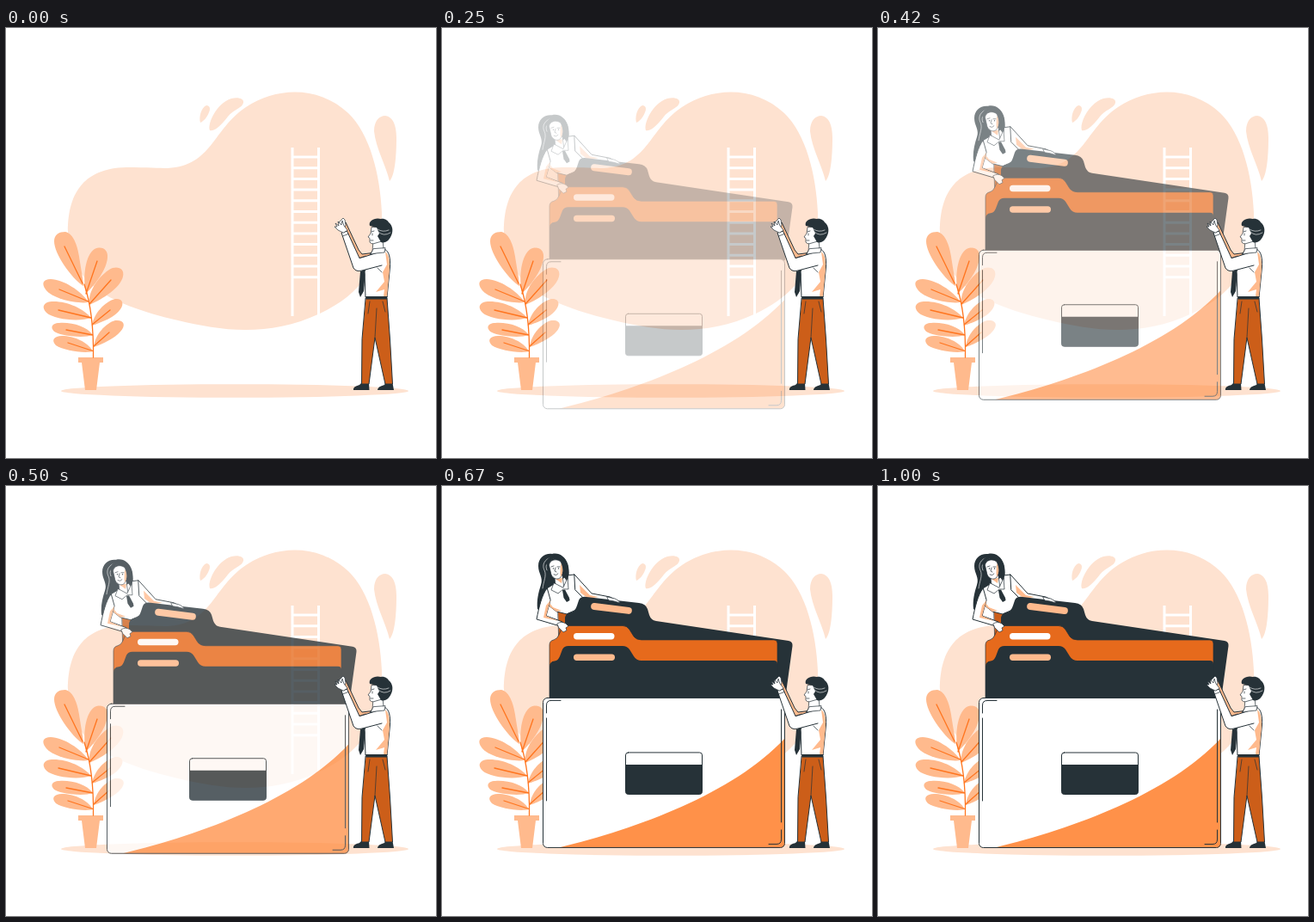
Recreate the animation shown at these times as an HTML page. Size 500 px wide and 500 px high, loop 1.04 s.

```html
<!DOCTYPE html>
<html lang="en">
<head>
<meta charset="utf-8">
<title>Folder illustration</title>
<style>
  html, body { margin: 0; width: 100%; height: 100%; overflow: hidden; background: #fff; }
  svg { display: block; width: 100%; height: 100%; }
  .pale { fill: #fee2d0; }
  .soft { fill: #ffba8d; }
  .main { fill: #ff9149; }
  .deep { fill: #e66a1c; }
  .rust { fill: #cc5e19; }
  .dark { fill: #263238; }
  .white { fill: #fff; }
  .line { stroke: #263238; stroke-width: 1; stroke-linejoin: round; stroke-linecap: round; }
  .thin { stroke-width: .7; }
  .open { fill: none; }
  .vein { fill: none; stroke: #ff751f; stroke-width: 1.3; stroke-linecap: round; }
  .ladder { fill: none; stroke: #fff; stroke-width: 3; }
  .strand { fill: none; stroke: #fff; stroke-width: .6; stroke-linecap: round; }
</style>
</head>
<body>
<svg viewBox="0 0 500 500">
  <!-- backdrop -->
  <g class="pale">
    <path d="M72 237C72 195 88 163 140 162C165 162 178 163 188 163C240 160 240 118 279 92C315 68 364 67 398 99C423 123 435 170 437 215C439 275 412 310 365 332C305 360 250 352 200 340C160 331 122 317 105 303C82 285 72 262 72 237Z"/>
    <path d="M226 110C224 104 227 92 233 90C237 90 238 94 236 98C234 104 229 109 226 110Z"/>
    <path d="M237 119C234 112 244 88 262 82C270 80 277 82 276 87C275 93 264 95 258 103C252 111 243 121 237 119Z"/>
    <path d="M446 178C442 160 430 140 428 120C428 108 434 102 441 102C450 103 454 113 454 128C454 150 452 172 446 178Z"/>
    <ellipse cx="266" cy="422" rx="202" ry="7.8"/>
  </g>
  <path id="ladder" class="ladder"/>

  <!-- plant -->
  <g class="soft">
    <path d="M90 300C75 290 56 262 56 248C56 240 62 237 69 237C79 239 84 255 86 272C88 285 90 294 90 300Z"/>
    <path d="M93 309C89 290 92 264 103 257C112 253 119 258 118 267C117 281 104 298 93 309Z"/>
    <path d="M97 322C94 305 112 284 124 279C132 277 138 281 136 289C133 302 113 315 97 322Z"/>
    <path d="M96 319C82 321 54 315 46 304C41 297 43 292 52 292C66 292 88 306 96 319Z"/>
    <path d="M99 337C85 342 56 339 47 331C41 325 43 319 53 318C70 317 90 326 99 337Z"/>
    <path d="M100 346C102 332 115 318 127 315C135 314 138 320 133 327C127 336 112 342 100 346Z"/>
    <path d="M101 357C90 361 66 358 58 354C51 350 52 343 62 343C77 342 94 347 101 357Z"/>
    <path d="M102 371C103 357 116 343 127 340C137 339 140 345 133 353C126 361 113 367 102 371Z"/>
    <path d="M101 376C90 379 65 374 58 369C52 363 56 358 65 358C79 358 95 365 101 376Z"/>
    <path d="M84 383H113V389H109L105 421H92L88 389H84Z"/>
  </g>
  <path class="vein" d="M101.500 383C102 352 100 325 91 298M68 254L89 297M106 271L93 309M122 293L97 321M62 304L96 318M61 328L99 337M121 328L100 345M70 351L101 357M120 354L102 370M72 366L101 375.500"/>

  <!-- rising folder -->
  <g id="folder">
    <!-- woman -->
    <path class="dark" d="M128 79C119 78 112 84 112 93C112 102 118 106 115 115C112 124 110 133 111 143C116 147 120 142 122 135L126 119L147 112C148 104 148 95 146 90C143 82 136 77 128 79Z"/>
    <path class="strand" d="M127 83C119 85 116 92 119 98C122 104 118 111 117 119M131 83C123 87 119 92 122 98"/>
    <path class="rust line thin" d="M135 145L151 147L150 168L136 176Z"/>
    <path class="white line" d="M122 119L132 113L146 104L154 103L162 114L165 140L145 149L133 146L124 139Z"/>
    <path class="soft" d="M125 136L129 141L139 145L133 146L125 140Z"/>
    <path class="white line" d="M154 103L174 125L195 129L207 135L195 134L168 134L155 121Z"/>
    <path class="soft" d="M160 115L172 127L182 129L170 131L161 124Z"/>
    <path class="white line thin" d="M131 106L132 117L142 119L140 104Z"/>
    <path class="soft" d="M132 108L140 107L139 113Z"/>
    <path class="white line thin" d="M124.500 92C125 86 133 84 138 88C141 94 141 101 138 106C135 110 129 108 127 103Z"/>
    <path class="soft" d="M138 90C141 95 141 101 138 106C137 101 138 95 138 90Z"/>
    <path class="dark" d="M123 95C124 87 129 83 135 84C141 86 143 94 142 106L146 112C148 102 148 92 143 85C136 78 122 80 121 90Z"/>
    <path class="line thin open" d="M127 94L130 93M134 94L137 94M132 95L131 99L133 100M130 103Q133 105 135 102"/>
    <circle class="dark" cx="129.500" cy="96" r=".7"/>
    <circle class="dark" cx="135.500" cy="96" r=".7"/>
    <path class="white line thin" d="M130 113L127 121L135 125L141 120L147 120L146 107L141 118Z"/>
    <path class="dark" d="M140 121L143 120.500L148 130L148.500 133L145 135L141.500 130Z"/>
    <path class="white line" d="M122 119C116 127 113 140 110 155L137 163L144 163L140 158L121 151L126 133Z"/>
    <path class="soft" d="M121 139L126 133L121 151L135 157L118 153Z"/>

    <!-- sheets, back to front -->
    <path class="dark" d="M143 200V153Q144 148 149 147Q155 146 157 139L159 133Q161 128 168 129L229 136Q237 137 239 143L241 150Q243 156 249 157L403 180Q408 181 407.500 186L399 248H143Z"/>
    <rect class="soft" x="173" y="138.500" width="48" height="8" rx="4" transform="rotate(7 197 142.500)"/>
    <path class="deep line thin" d="M125 247V185Q125 180 130 179Q134 178 136 173L139 166Q141 162.500 146 162.500H210Q215 162.500 218 167L223 175Q226 179 232 179H386Q390 179 390 183V247Z"/>
    <rect class="white" x="153" y="171" width="47.500" height="7.500" rx="3.700"/>
    <path class="dark" d="M125 248V210Q125 204 131 203.500Q135 203 137 198L140 190Q142 186 147 186H210Q215 186 218 190L223 198Q226 203 232 203H386Q390 203 390 207V248Z"/>
    <rect class="soft" x="153" y="195.500" width="48" height="7.500" rx="3.700"/>
    <path class="white line thin" d="M134 160Q139 157 144 160L147 163L144 165L145 168L141 170L136 165Z"/>
    <path class="white line thin" d="M192 129L201 131Q206 133 207 136L200 134L194 133Z"/>

    <!-- front cover -->
    <rect class="white" x="117.500" y="246.500" width="281" height="174" rx="5"/>
    <path class="main" d="M136 420.500C228 398 338 358 398.500 293.500V415.500Q398.500 420.500 393.500 420.500Z"/>
    <rect class="line open" x="117.500" y="246.500" width="281" height="174" rx="5"/>
    <path class="line open" d="M121.500 264V255Q121.500 249.500 127 249.500H138M121.500 270V366M394.500 260V391M394.500 400V411Q394.500 416.500 389 416.500H380"/>
    <rect class="white line" x="213.500" y="310" width="89" height="48.500" rx="3"/>
    <path class="dark" d="M213.500 324H302.500V355.500Q302.500 358.500 299.500 358.500H216.500Q213.500 358.500 213.500 355.500Z"/>
  </g>

  <!-- man -->
  <g>
    <path class="soft line" d="M391 231L395 226L410 258L414 263L430 261L428 269L412 269Q407 268 404 263Z"/>
    <path class="white line thin" d="M388 230L387 226L390 223L392 221L394 223L395 229L393 234Z"/>
    <path class="dark" d="M404 421Q403 417 411 415L413 413H422L422.500 421ZM432 421Q432 417 440 415L441 413H449.500L451 421Z"/>
    <path class="rust line" d="M418.500 314H443L446.500 362L449.500 414H441L433 378L429 360L422 414H413.500L414 362Z"/>
    <path class="line open thin" d="M429 360L431 326M423 318L421 332M438 318L441 330"/>
    <path class="white line" d="M424 262L428 257L440 257C446 260 447 268 446.500 278L443 313H418L417 284Z"/>
    <path class="soft" d="M441 260C446 264 446 272 446 280L443 312H439L440 304L430 307L440 295L438 284L443 275Z"/>
    <path class="dark" d="M412 283L417 281L417.500 287L416 306L412 313L410 307Z"/>
    <path class="dark" d="M418.500 312H443.500L443 315.500H418.500Z"/>
    <path class="white line" d="M440 260C432 260 422 265 411 267.500L396.500 236L390 238L404 279Q407 284 414 282L437 276"/>
    <path class="line open thin" d="M391.500 242L398 239.500M411 267.500L418 265M432 279L437 284"/>
    <path class="white line thin" d="M392 238L386 235L382 231L385 231L383 227L387 230L386 225L390 229L391 224L393 230L397 235Z"/>
    <path class="white line thin" d="M427 247L426 260L439 257L438 245Z"/>
    <path class="white line thin" d="M425 232L424 239L421 243L423 244.500L423 249Q425 252 430 250L437 248L436 232Z"/>
    <path class="dark" d="M423 230C421 224 429 220 436 222C440 221 444 224 445 226C450 230 450 236 448.500 240C446 247 441 251 436 249L432 242L434 239L431 232Z"/>
    <path class="strand" d="M433 237Q439 243 447 238M432 234Q438 238 445 235"/>
    <path class="line open thin" d="M425 237L428 236M426 239V241M424 247H427"/>
    <path class="white line thin" d="M427 257L424 263L430 262L440 261L441 256Z"/>
  </g>
</svg>
<script>
  const loop = 1040, fps = 24, poses = 24, lead = .4, rise = 30;
  const folder = document.getElementById('folder');

  let rungs = 'M333 139V335M363.5 139V335';
  for (let i = 0; i < 12; i++) rungs += `M333 ${150 + i * 12.7}H363.5`;
  document.getElementById('ladder').setAttribute('d', rungs);

  const cubic = (a, b, s) => 3 * (1 - s) * (1 - s) * s * a + 3 * (1 - s) * s * s * b + s * s * s;

  // cubic-bezier(.36, -.01, .5, 1.38)
  function ease(x) {
    let lo = 0, hi = 1;
    for (let i = 0; i < 24; i++) {
      const mid = (lo + hi) / 2;
      if (cubic(.36, .5, mid) < x) lo = mid; else hi = mid;
    }
    return cubic(-.01, 1.38, hi);
  }

  // The motion is held at 24 poses a second, each taken a little into its slot.
  function draw(ms) {
    const pose = Math.floor((ms % loop + 5) * fps / 1000);
    const p = pose ? ease(Math.min(1, (pose + lead) / poses)) : 0;
    folder.setAttribute('opacity', Math.max(0, Math.min(1, p)));
    folder.setAttribute('transform', `translate(0 ${rise * (1 - p)})`);
  }

  let start;
  function tick(now) {
    start ??= now;
    draw(now - start);
    requestAnimationFrame(tick);
  }
  draw(0);
  requestAnimationFrame(tick);
</script>
</body>
</html>
```
